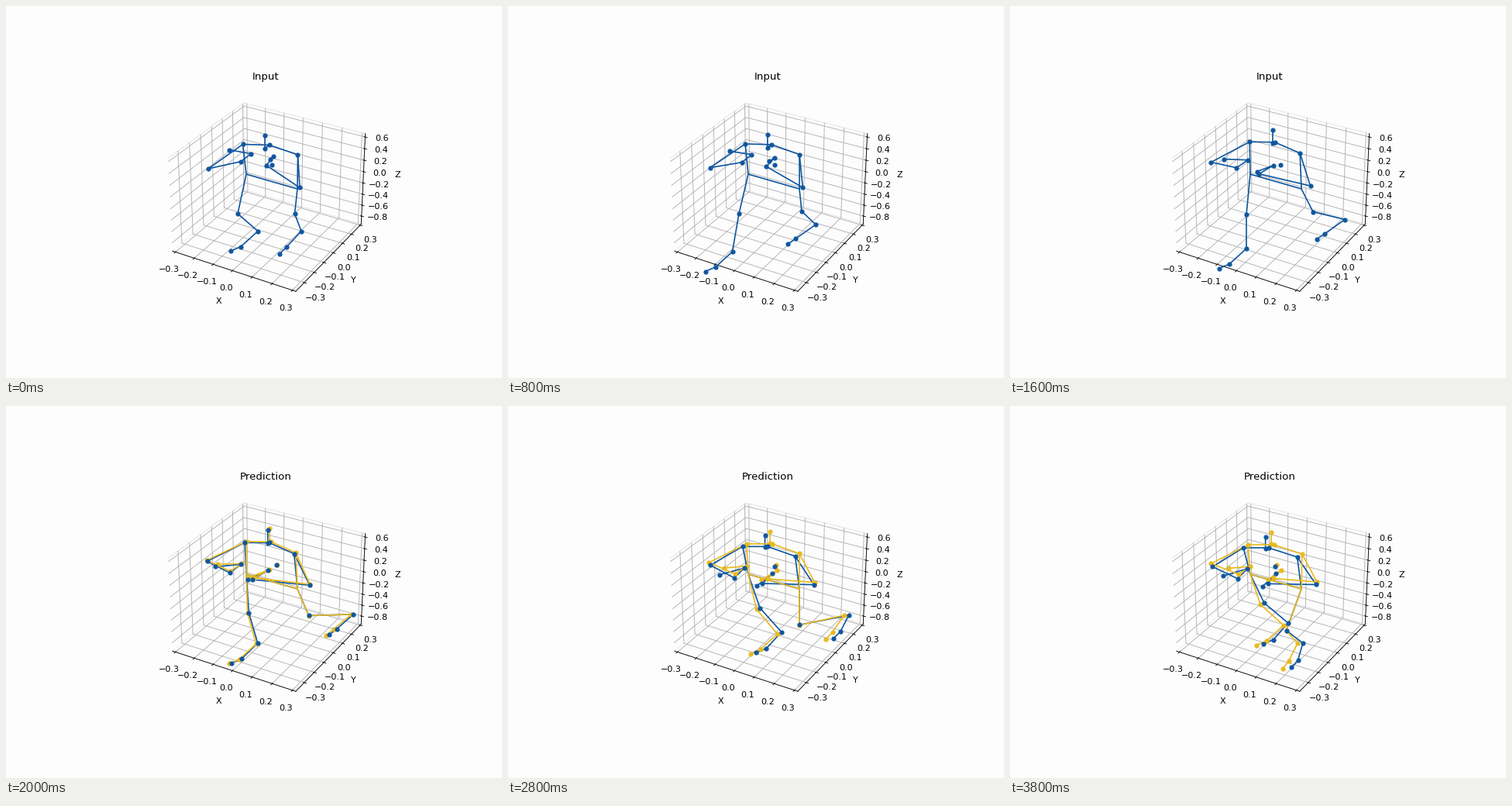
Write a matplotlib script that moves like this. It is 640 px wide and 480 px high and loops after 4 s.

```python
import numpy as np
import matplotlib.pyplot as plt
from matplotlib.animation import FuncAnimation

W, H, DPI = 640, 480, 80
FRAMES, STEP = 20, 200
SPLIT = 10                      # first predicted frame
BLUE, GOLD, PAPER = "#0f569f", "#e9b91f", "#fdfdfd"

CHAINS = ["head chin neck", "lsh neck rsh",
          "lsh lelbow lwrist lfinger lthumb", "rsh relbow rwrist rfinger rthumb",
          "lsh lhip rhip rsh", "lhip lknee lankle lheel ltoe",
          "rhip rknee rankle rheel rtoe"]
HIPS = {"lhip": (310, 217), "rhip": (376, 236)}
KEYS = np.array([0, 4, 8, 12, 16, 19], float)


def reach(t):
    """Arms settle from the first pose into the second."""
    return 1 / (1 + np.exp((8 - t) / 1.6))


def swing(t):
    """Sway out and back in mid-step."""
    return np.exp(-((t - 9.5) / 4) ** 2)


def error(t):
    """Prediction error grows from zero and levels off."""
    return 1 - np.exp(-max(t - 9, 0) / 2.5)


def glide(home, to, sway):
    home, to, sway = map(np.array, (home, to, sway))
    return lambda t: home + to * reach(t) + sway * swing(t)


def spline(x, y):
    """Cubic Hermite path through key points at KEYS."""
    pts = np.column_stack([x, y]).astype(float)
    slope = np.gradient(pts, KEYS, axis=0, edge_order=2)

    def at(t):
        i = min(np.searchsorted(KEYS, t, side="right") - 1, len(KEYS) - 2)
        h = KEYS[i + 1] - KEYS[i]
        u = (t - KEYS[i]) / h
        return ((1 + 2 * u) * (1 - u) ** 2 * pts[i]
                + u * u * (3 - 2 * u) * pts[i + 1]
                + h * u * (1 - u) ** 2 * slope[i]
                - h * u * u * (1 - u) * slope[i + 1])

    return at


def bone(start, vec, turn=(0, 0)):
    """Joint hung on another one, turning once per 24-frame stride."""
    vec, turn = np.array(vec), np.array(turn)
    return lambda t: start(t) + vec + turn * np.sin(2 * np.pi * t / 24)


lankle = spline([325, 289.5, 305, 340, 351, 353],
                [290.5, 317, 313, 300, 289, 283])
rankle = spline([381, 397, 432, 450, 408.5, 371],
                [290.5, 282, 275.5, 265, 281, 306])
lheel = bone(lankle, (-22, 20))
rheel = bone(rankle, (-19, 20.5), (-8, -2.5))

# joint: (path, error of the prediction once it has levelled off)
JOINTS = {
    "head": (glide((334, 167), (3, -4), (4, -5.5)), (-7.5, 6)),
    "chin": (glide((334, 184), (3, -5.5), (4, -5)), (-7.5, 6)),
    "neck": (glide((340, 179.5), (0.5, -0.5), (1.5, -4)), (-7, 4)),
    "lsh": (glide((305.5, 178.5), (1.5, 0.5), (3.5, -4)), (-6, 4)),
    "rsh": (glide((376.5, 192), (0.5, -1), (-3, -2)), (-6.5, 4)),
    "lelbow": (glide((261, 210), (-1.5, -6.5), (-1, -6)), (2, 4)),
    "lwrist": (glide((303.5, 200.5), (-8.5, 16.5), (-8, 0)), (-1, 6)),
    "lfinger": (glide((316, 190.5), (-6, 16.5), (-7, 0)), (-4, 3)),
    "lthumb": (glide((288.5, 185.5), (-6.5, 24), (-11, 0)), (-7, 10)),
    "relbow": (glide((379, 234.5), (17, -7.5), (0, 1.5)), (-1, 3.5)),
    "rwrist": (glide((336, 205.5), (4, 17), (-19, 3)), (-7, 7)),
    "rfinger": (glide((345, 194), (5, 18), (-9, 3)), (-7, 4)),
    "rthumb": (glide((341, 198), (-8, 26), (-21, 3)), (-7, 9)),
    "chest": (glide((343, 205), (1, 0), (6, -0.5)), (-2.5, 2)),
    "lknee": (spline([299, 298, 305, 318, 322, 323],
                     [268, 268, 269, 265, 259.5, 256]), (5, -2)),
    "rknee": (spline([372.5, 379, 391, 386, 365, 356.5],
                     [268, 265, 265.5, 277, 287.5, 290]), (0, -0.5)),
    "lankle": (lankle, (6, -3)),
    "rankle": (rankle, (7, 0)),
    "lheel": (lheel, (9, -1.5)),
    "rheel": (rheel, (12, -1)),
    "ltoe": (bone(lheel, (-13, 5.5)), (9, -1.5)),
    "rtoe": (bone(rheel, (-9, 8.5), (-1, -2)), (12, -2)),
}

fig = plt.figure(figsize=(W / DPI, H / DPI), dpi=DPI, facecolor=PAPER)

# 3D box
side, left, bottom = 283, 193.5, 386
box = fig.add_axes([left / W, 1 - bottom / H, side / W, side / H],
                   projection="3d", facecolor="none")
box.set(xlim=(-0.316, 0.316), ylim=(-0.384, 0.312), zlim=(-0.948, 0.658),
        xlabel="X", ylabel="Y", zlabel="Z")
box.set_xticks(np.arange(-3, 4) / 10)
box.set_yticks(np.arange(-3, 4) / 10)
box.set_zticks(np.arange(-4, 4) / 5)
for axis in (box.xaxis, box.yaxis, box.zaxis):
    axis.set_major_formatter(lambda v, _: f"{v:.1f}".replace("-", "\u2212"))
    axis.set_pane_color(PAPER)
    axis.pane.set_edgecolor("#e8e8e8")
title = box.set_title("Input", pad=7)

# Skeleton layer in stage pixels
stage = fig.add_axes([0, 0, 1, 1], facecolor="none")
stage.set(xlim=(0, W), ylim=(H, 0))
stage.axis("off")


def skeleton(color, line_z, dot_z):
    bones = [stage.plot([], [], color=color, lw=1.5, zorder=line_z)[0]
             for _ in CHAINS]
    dots, = stage.plot([], [], "o", color=color, ms=4.6, zorder=dot_z)
    return bones, dots


def place(body, t, off):
    bones, dots = body
    pose = {name: path(t) + off * np.array(miss)
            for name, (path, miss) in JOINTS.items()}
    dots.set_data(*zip(*pose.values()))
    pose.update(HIPS)
    for line, chain in zip(bones, CHAINS):
        line.set_data(*zip(*(pose[name] for name in chain.split())))


main = skeleton(BLUE, 2, 5)
other = skeleton(GOLD, 3, 4)


def draw(i):
    predicted = i >= SPLIT
    title.set_text("Prediction" if predicted else "Input")
    place(main, i, error(i) if predicted else 0)
    place(other, i, 0)
    for part in [*other[0], other[1]]:
        part.set_visible(predicted)
    return []


anim = FuncAnimation(fig, draw, frames=FRAMES, interval=STEP, repeat=True,
                     repeat_delay=0, init_func=lambda: draw(0))
plt.show()
```
